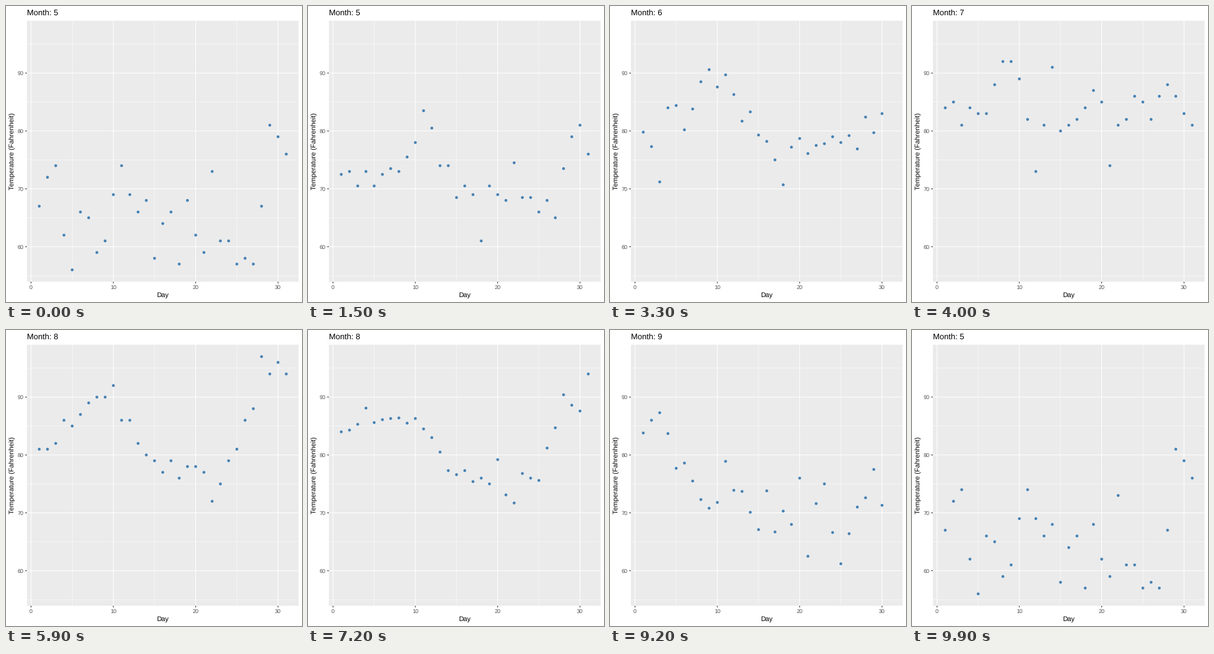
Recreate the animation shown at these times as a matplotlib script. Size 480 by 480 pixels, loop 10000 ms.

```python
import numpy as np
import matplotlib.pyplot as plt
from matplotlib.animation import FuncAnimation
from matplotlib.patches import Rectangle

plt.rcParams["font.family"] = "Liberation Sans"
plt.rcParams["text.hinting"] = "none"
plt.rcParams["text.hinting_factor"] = 1

SIZE, DPI = 480, 72
LEFT, RIGHT, TOP, BOTTOM = 33.9, 474.5, 23.9, 447.1   # panel edges in pixels
X_MIN, X_MAX = -0.5, 32.5
Y_MIN, Y_MAX = 53.95, 99.05
FRAMES, INTERVAL, STEPS = 100, 100, 10
STARTS = (10, 30, 49, 69, 89)   # last still frame of each month
DAYS = np.arange(1, 32)

# Daily temperatures (airquality data set)
may = [67, 72, 74, 62, 56, 66, 65, 59, 61, 69, 74, 69, 66, 68, 58, 64,
       66, 57, 68, 62, 59, 73, 61, 61, 57, 58, 57, 67, 81, 79, 76]
june = [78, 74, 67, 84, 85, 79, 82, 87, 90, 87, 93, 92, 82, 80, 79, 77,
        72, 65, 73, 76, 77, 76, 76, 76, 75, 78, 73, 80, 77, 83]
july = [84, 85, 81, 84, 83, 83, 88, 92, 92, 89, 82, 73, 81, 91, 80, 81,
        82, 84, 87, 85, 74, 81, 82, 86, 85, 82, 86, 88, 86, 83, 81]
august = [81, 81, 82, 86, 85, 87, 89, 90, 90, 92, 86, 86, 82, 80, 79, 77,
          79, 76, 78, 78, 77, 72, 75, 79, 81, 86, 88, 97, 94, 96, 94]
september = [91, 92, 93, 93, 87, 84, 80, 78, 75, 73, 81, 76, 77, 71, 71, 78,
             67, 76, 68, 82, 64, 71, 81, 69, 63, 70, 77, 75, 76, 68]


def padded(temps):
    """Fill a month out to 31 days with NaN."""
    return np.array(temps + [np.nan] * (31 - len(temps)), dtype=float)


MONTHS = [padded(m) for m in (may, june, july, august, september)]


def px(day):
    return LEFT + (day - X_MIN) / (X_MAX - X_MIN) * (RIGHT - LEFT)


def py(temp):
    return BOTTOM - (temp - Y_MIN) / (Y_MAX - Y_MIN) * (BOTTOM - TOP)


fig = plt.figure(figsize=(SIZE / DPI, SIZE / DPI), dpi=DPI, facecolor="white")
ax = fig.add_axes([0, 0, 1, 1])
ax.set_xlim(0, SIZE)
ax.set_ylim(SIZE, 0)
ax.axis("off")


def line(xs, ys, color, width, z):
    ax.plot(xs, ys, color=color, lw=width, zorder=z, snap=False,
            solid_capstyle="butt")


def label(x, y, text, size, color="black", ha="center", **kw):
    return ax.text(x, y, text, fontsize=size, color=color, ha=ha,
                   va="baseline", **kw)


ax.add_patch(Rectangle((LEFT, TOP), RIGHT - LEFT, BOTTOM - TOP,
                       fc="#EBEBEB", lw=0, snap=False, zorder=0))

# Grid: thin minor lines below the major ones
for day in (5, 15, 25):
    line([px(day)] * 2, [TOP, BOTTOM], "white", 0.53, 1)
for temp in (55, 65, 75, 85, 95):
    line([LEFT, RIGHT], [py(temp)] * 2, "white", 0.53, 1)

for day in (0, 10, 20, 30):
    x = px(day)
    line([x, x], [TOP, BOTTOM], "white", 1.07, 2)
    line([x, x], [BOTTOM, BOTTOM + 2.75], "#333333", 1.07, 3)
    label(x, 458.8, str(day), 8.8, "#4D4D4D")
for temp in (60, 70, 80, 90):
    y = py(temp)
    line([LEFT, RIGHT], [y, y], "white", 1.07, 2)
    line([LEFT - 2.75, LEFT], [y, y], "#333333", 1.07, 3)
    label(LEFT - 4.95, y + 3.15, str(temp), 8.8, "#4D4D4D", ha="right")

label((LEFT + RIGHT) / 2, 472.1, "Day", 11)
label(13.4, (TOP + BOTTOM) / 2, "Temperature (Fahrenheit)", 11,
      rotation=90, rotation_mode="anchor")
title = label(LEFT, 15, "", 13.2, ha="left")

dots = ax.scatter(px(DAYS), py(MONTHS[0]), s=[4.62 ** 2] * len(DAYS),
                  c="steelblue", linewidths=0, zorder=4)
dots.set_snap(False)


def state(frame):
    """Month index and progress towards the next month."""
    for i, start in enumerate(STARTS):
        if frame <= start + STEPS:
            return i, max(0, frame - start) / STEPS


def update(frame):
    i, t = state(frame)
    j = (i + 1) % len(MONTHS)
    near = j if t > 0.5 else i
    temps = MONTHS[i] + t * (MONTHS[j] - MONTHS[i])
    # Days missing from one month pop in or out halfway
    temps = np.where(np.isnan(temps), MONTHS[near], temps)
    shown = ~np.isnan(temps)
    dots.set_offsets(np.column_stack([px(DAYS[shown]), py(temps[shown])]))
    title.set_text(f"Month: {near + 5}")
    return dots, title


anim = FuncAnimation(fig, update, frames=FRAMES, interval=INTERVAL,
                     repeat=True, repeat_delay=0)
plt.show()
```
